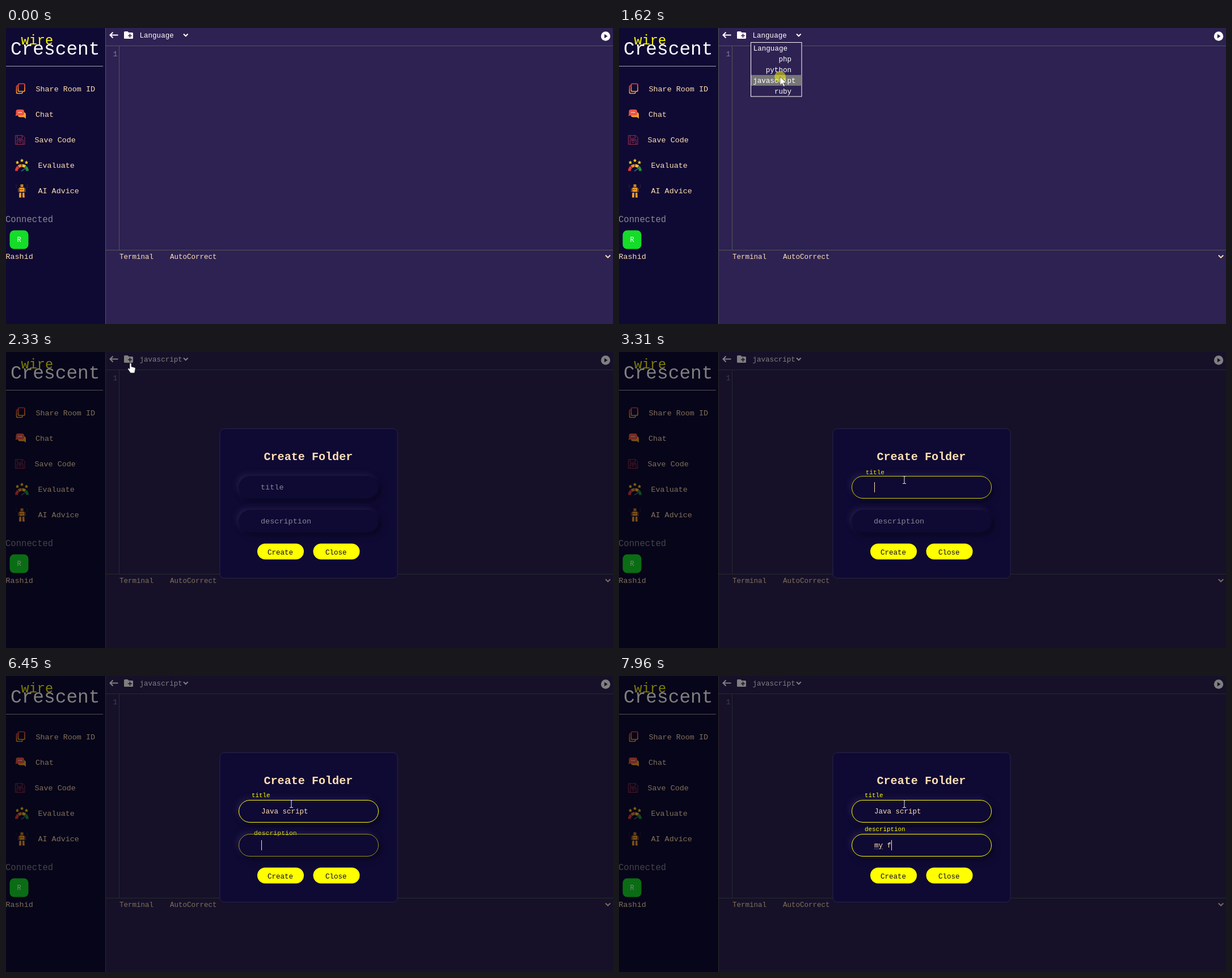
An HTML page for the animation above (8000 ms loop, 1070 by 523 pixels).

```html
<!DOCTYPE html>
<html lang="en">
<head>
<meta charset="utf-8">
<title>Code room</title>
<style>
  html, body { margin: 0; width: 100%; height: 100%; overflow: hidden; background: #2d2252; }
  svg { display: block; }
  text { font: 12.5px "Liberation Mono", "Noto Sans Mono", monospace; white-space: pre; }
  .cream { fill: #ffdfb3; }
  .white { fill: #fff; }
  .nav text { font-size: 13.4px; }
  .line { fill: none; stroke: #555; }
  .icon { fill: none; stroke: #fff; stroke-width: 2; }
  .menu text { font-size: 12.55px; fill: #fff; text-anchor: end; }
  .button { fill: #ff0; }
  .glow, .shade, .edge { fill: #0f0a33; }
  .glow { filter: drop-shadow(-4px -4px 5px #211b48); }
  .shade { filter: drop-shadow(5px 5px 6px #090521); }
</style>
</head>
<body>
<svg width="1070" height="523" viewBox="0 0 1070 523">
  <defs>
    <linearGradient id="warm" x2="0" y2="1">
      <stop stop-color="#e83c40"/><stop offset="1" stop-color="#f5a52a"/>
    </linearGradient>
    <path id="star" d="M0-3.4 1-1.1 3.4-1 1.5.6 2.1 3 0 1.7-2.1 3-1.5.6-3.4-1-1-1.1Z" fill="#ffd21c"/>
  </defs>

  <rect width="1070" height="523" fill="#2d2252"/>
  <rect width="175" height="523" fill="#0f0a33"/>
  <path class="line" d="M175.5 0V523M175 31.5H1070M199.5 32V392M175 392.5H1070"/>
  <path d="M0 67.5H171" stroke="#a3a2ae"/>

  <text class="white" x="8" y="47" style="font-size:32.8px">Crescent</text>
  <text x="26.5" y="29" fill="#ff0" style="font-size:23.6px">wire</text>

  <g class="nav cream">
    <text x="52.5" y="112">Share Room ID</text>
    <text x="52" y="157">Chat</text>
    <text x="50.5" y="202">Save Code</text>
    <text x="56.5" y="247">Evaluate</text>
    <text x="56.5" y="292">AI Advice</text>
    <text x="-.5" y="408">Rashid</text>
  </g>
  <text x="-1" y="343" fill="#8b8690" style="font-size:15.6px">Connected</text>
  <rect x="6.5" y="357.5" width="33" height="33" rx="8" fill="#14dc28"/>
  <text class="white" x="23" y="378" text-anchor="middle" style="font-size:12px">R</text>

  <!-- sidebar icons -->
  <g fill="none" stroke="url(#warm)" stroke-width="1.7">
    <rect x="21.5" y="98.5" width="11.5" height="13.5" rx="2"/>
    <path d="M21 102H20Q18.5 102 18.5 104V113.5Q18.5 115.5 20.5 115.5H27Q29 115.5 29 113"/>
  </g>
  <path d="M24 149H31.5Q35 149 35 153V160L31.5 157.5H25Q21 157.5 21 154Z" fill="#f5a52a"/>
  <path d="M21 144H28.5Q32 144 32 147.5V151Q32 154.5 28.5 154.5H20L16.5 155.5L17.5 152V147.5Q17.5 144 21 144Z" fill="#ee5442"/>
  <path d="M21.5 149.3H28" stroke="#fff" stroke-width="1.4" stroke-dasharray="1.4 1.1"/>
  <g fill="none" stroke="#9c3050">
    <path d="M16.5 190H29.5L33 193.5V205.5H16.5ZM19.5 190V195H28.5V190M19.5 205.5V197.5H30V205.5"/>
    <circle cx="24.7" cy="200.5" r="2"/>
  </g>
  <use href="#star" x="20" y="237.5"/><use href="#star" x="28" y="234"/><use href="#star" x="36" y="237.5"/>
  <g fill="none" stroke-width="5">
    <path d="M18.5 252.5A9.5 9.5 0 0 1 21.5 245.5" stroke="#e03a3a"/>
    <path d="M22 245A9.5 9.5 0 0 1 27.5 243" stroke="#f08a28"/>
    <path d="M28.5 243A9.5 9.5 0 0 1 34 245" stroke="#f5c030"/>
    <path d="M34.5 245.5A9.5 9.5 0 0 1 37.5 252.5" stroke="#22953c"/>
    <path d="M27 253L34 248" stroke="#345a80" stroke-width="2"/>
  </g>
  <path d="M25.5 276.5H30.5V281H25.5ZM23.5 282H32.5V289.5H23.5ZM23.5 291H27V299.5H23V295ZM29 291H32.5V295L33 299.5H29Z" fill="#f29a2a"/>
  <path d="M22 283V290M34 283V290" stroke="#b06c28"/>
  <path d="M25 285.5H31M26 279H30" stroke="#0f0a33" stroke-dasharray="1.5 1.5"/>
  <path d="M18 277V284M37.5 277V284" stroke="#5c4034" stroke-dasharray="1.5 2"/>

  <!-- toolbar -->
  <path class="icon" d="M197.5 12.5H184M188.5 7.5L183.5 12.5L188.5 17.5"/>
  <path class="white" d="M209.5 6H214.5L216.5 8H222.5Q224 8 224 9.5V17.5Q224 19 222.5 19H209.5Q208 19 208 17.5V7.5Q208 6 209.5 6Z"/>
  <path d="M215 13.5H222M218.5 10V17" stroke="#2d2252" stroke-width="1.6"/>
  <text class="white" id="language" x="235.5" y="17" style="font-size:12.55px">Language</text>
  <path class="icon" d="M313 10.5L316.8 14.3L320.6 10.5"/>
  <circle class="white" cx="1057" cy="14.5" r="8.2"/>
  <path d="M1054.8 10.8V18.2L1060.5 14.5Z" fill="#2d2252"/>
  <text x="188.5" y="50" fill="#817b9a" style="font-size:13.4px">1</text>
  <text class="cream" x="200" y="407.5">Terminal</text>
  <text class="cream" x="289" y="407.5">AutoCorrect</text>
  <path class="icon" d="M1056.8 401.5L1061 405.7L1065.2 401.5" style="stroke:#ffdfb3"/>

  <g class="menu" id="menu">
    <rect x="232.5" y="25.5" width="89.5" height="95.5" fill="#2d2252" stroke="#fff"/>
    <rect id="hover" x="233" width="88.5" height="19" fill="#767676"/>
    <text x="297" y="40">Language</text>
    <text x="304" y="59">php</text>
    <text x="304" y="78">python</text>
    <text x="311.5" y="97">javascript</text>
    <text x="304" y="116">ruby</text>
  </g>

  <g id="modal">
    <rect width="1070" height="523" opacity=".5"/>
    <rect x="377" y="135.5" width="313" height="264" rx="8" fill="#0f0a33" stroke="#29234f"/>
    <text class="cream" x="454.5" y="191" style="font-size:20.1px;font-weight:bold">Create Folder</text>
    <g id="fields"></g>
    <rect class="button" x="443" y="338.5" width="82" height="28" rx="14"/>
    <rect class="button" x="541.5" y="338.5" width="82" height="28" rx="14"/>
    <text x="461" y="357.5" fill="#0f0a33">Create</text>
    <text x="563" y="357.5" fill="#0f0a33">Close</text>
  </g>

  <circle id="click" r="10" fill="#ff0" opacity=".5"/>
  <g id="pointer">
    <path id="arrow" d="M0 0V15L3.6 11.8L6 17.3L8.5 16.2L6 10.9H10.8Z" fill="#fff" stroke="#222" stroke-width=".6"/>
    <path id="hand" d="M-1 1.5Q.5-.5 2 1.5V7L8 8.5Q9 9 9 10.5L7.5 18H.5L-4 11.5Q-4.5 9.5-3 9.5L-1 11Z" fill="#fff" stroke="#222" stroke-width=".6"/>
    <path id="beam" d="M-3-6.5H-1Q0-6.5 0-5.5Q0-6.5 1-6.5H3M0-6V6M-3 6.5H-1Q0 6.5 0 5.5Q0 6.5 1 6.5H3" fill="none" stroke="#e8e8e8"/>
  </g>
</svg>
<script>
const $ = id => document.getElementById(id);
const LOOP = 8000, PITCH = 7.5, MOVE = 550;
const show = (el, on) => el.style.display = on ? '' : 'none';
const mix = (a, b, p) => a + (b - a) * p;
const within = (t, a, b) => t >= a && t < b;
const smooth = p => p * p * (3 - 2 * p);

// The standard CSS "ease" curve
function ease(p) {
  if (p <= 0 || p >= 1) return p <= 0 ? 0 : 1;
  const bez = (a, b, s) => 3 * a * s * (1 - s) ** 2 + 3 * b * s * s * (1 - s) + s ** 3;
  let lo = 0, hi = 1;
  for (let i = 0; i < 20; i++) {
    const mid = (lo + hi) / 2;
    if (bez(.25, .25, mid) < p) lo = mid; else hi = mid;
  }
  return bez(.1, 1, lo);
}

// Pointer stops: time, x, y
const path = [
  [60, 985, 495], [790, 293, 12], [930, 293, 12], [1070, 293, 37], [1370, 284, 86],
  [1690, 284, 86], [2180, 219, 19], [2330, 219, 19], [2390, 250, 49], [2940, 503, 226]
];
const clicks = [[790, 880], [1620, 1690], [2190, 2330], [2900, 2970]];

// keys: when each letter is typed; off: when the caret is hidden; markAt: spelling underline
const fields = [
  { name: 'title', y: 219, focus: 2970, blur: 6200, typed: 'Java script', off: [3540, 4070], markAt: Infinity,
    keys: [4070, 4380, 4560, 4690, 4870, 4990, 5120, 5360, 5490, 5740, 5870] },
  { name: 'description', y: 279, focus: 6200, blur: LOOP, typed: 'my f', off: [6760, 7340], markAt: 7960,
    keys: [7340, 7520, 7700, 7900] }
];

for (const f of fields) {
  const box = cls => `<rect class="${cls}" x="410.5" y="${f.y + .5}" width="246" height="39" rx="19.5"/>`;
  const g = document.createElementNS('http://www.w3.org/2000/svg', 'g');
  g.innerHTML = box('glow') + box('shade') + box('edge') +
    `<text class="label">${f.name}</text>` +
    `<text class="cream value" x="450" y="${f.y + 24}"></text>` +
    `<path class="mark" d="M450 ${f.y + 26.5}h15" stroke="#8d899d" stroke-dasharray="1 1"/>` +
    `<path class="caret" stroke="#ffdfb3"/>`;
  $('fields').append(g);
  for (const part of ['edge', 'label', 'value', 'mark', 'caret']) f[part] = g.querySelector('.' + part);
}

function drawField(f, t) {
  const p = ease((t - f.focus) / MOVE), tint = p ** 2;
  f.edge.setAttribute('stroke', `rgba(255,255,0,${tint})`);
  f.label.setAttribute('x', mix(449, 433, p));
  f.label.setAttribute('y', f.y + mix(23.5, -5.5, p));
  f.label.style.fontSize = mix(13.5, 10.85, p) + 'px';
  f.label.style.fill = `rgb(${mix(136, 255, tint)},${mix(132, 255, tint)},${mix(152, 0, p)})`;
  const n = f.keys.filter(k => k <= t).length;
  f.value.textContent = f.typed.slice(0, n);
  show(f.mark, t >= f.markAt);
  show(f.caret, within(t, f.focus, f.blur) && !within(t, ...f.off));
  f.caret.setAttribute('d', `M${450.5 + n * PITCH} ${f.y + 11}v18`);
}

function pointerAt(t) {
  const i = path.findIndex(k => k[0] > t);
  if (i < 0) return path[path.length - 1].slice(1);
  if (!i) return path[0].slice(1);
  const [t0, x0, y0] = path[i - 1], [t1, x1, y1] = path[i];
  const p = smooth((t - t0) / (t1 - t0));
  return [mix(x0, x1, p), mix(y0, y1, p)];
}

function draw(t) {
  const [x, y] = pointerAt(t);
  const row = Math.max(0, Math.min(4, Math.floor((y - 26) / 19)));
  show($('menu'), within(t, 880, 1690));
  $('hover').setAttribute('y', 26 + 19 * row);
  $('language').textContent = t < 1690 ? 'Language' : 'javascript';
  show($('modal'), t >= 2330);
  fields.forEach(f => drawField(f, t));

  const hand = within(t, 1690, 2375) && x < 228, beam = t > 2330 && x > 410 && y > 215;
  show($('pointer'), t >= 60);
  show($('hand'), hand);
  show($('beam'), beam);
  show($('arrow'), !hand && !beam);
  $('pointer').setAttribute('transform', `translate(${x} ${y})`);
  show($('click'), clicks.some(c => within(t, ...c)));
  $('click').setAttribute('cx', x);
  $('click').setAttribute('cy', y);
}

const start = performance.now();
function tick() {
  draw((performance.now() - start) % LOOP);
  requestAnimationFrame(tick);
}
tick();
</script>
</body>
</html>
```
